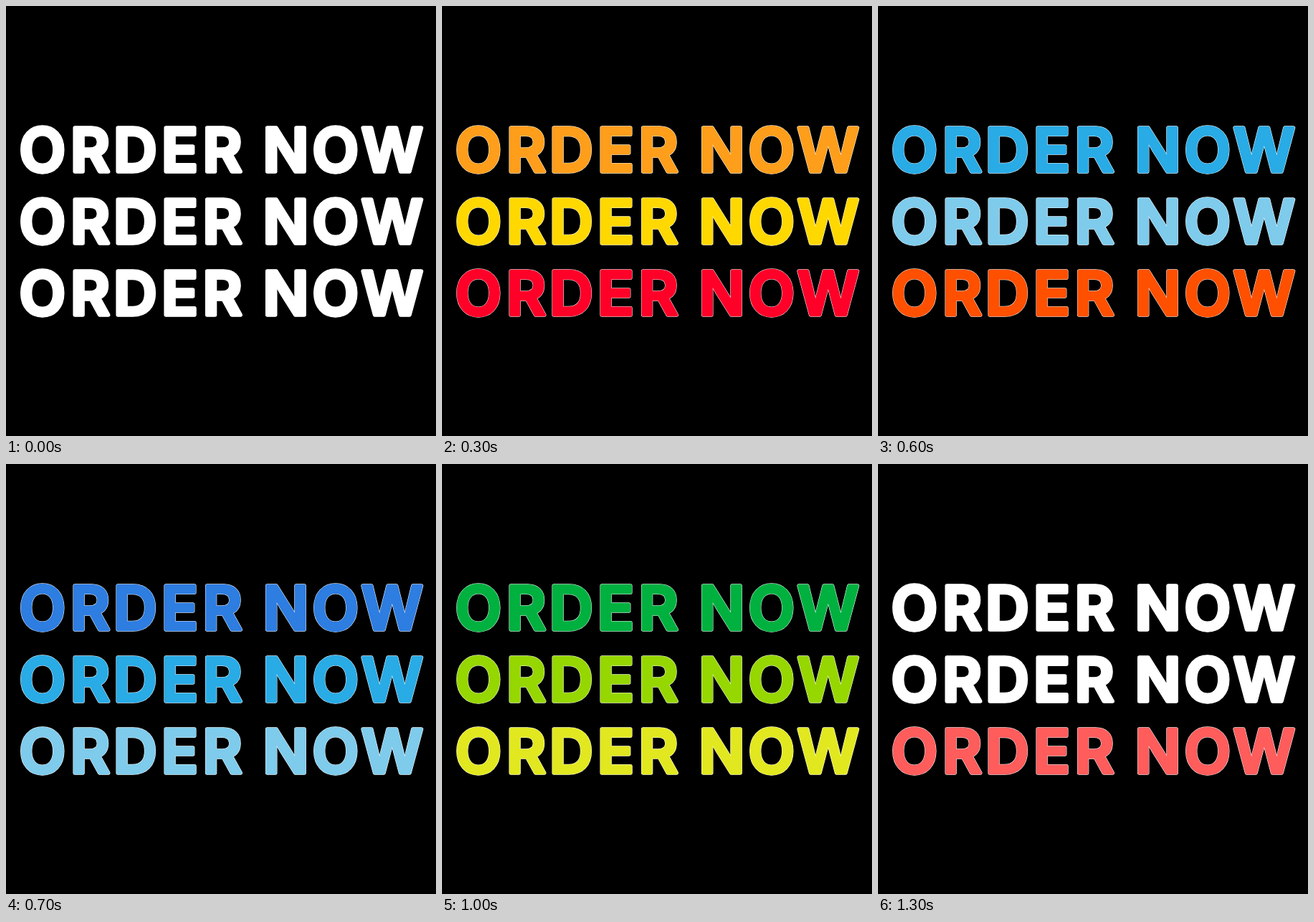
An HTML page with a canvas that plays this animation: 600x600 px, repeating every 1.4 s.

```html
<!DOCTYPE html>
<html lang="en">
<head>
<meta charset="utf-8">
<title>Order now</title>
<style>
  html, body { margin: 0; width: 100%; height: 100%; overflow: hidden; background: #000; }
  canvas { display: block; width: 100vw; height: 100vh; }
</style>
</head>
<body>
<canvas id="stage" width="600" height="600" role="img" aria-label="ORDER NOW, three times"></canvas>
<script>
const ctx = document.getElementById('stage').getContext('2d');
const STEP = 100;
const TEXT = 'ORDER NOW';
// Ink centre of each character; the space has none.
const CENTRES = [51, 119.5, 181.5, 243.5, 304, 0, 390.5, 460, 539];
const COLORS = [
  '#ffffff', '#ff0028', '#ffd800', '#ff9e1b', '#ff5000', '#7ecbec', '#29abe6',
  '#2e7de1', '#e2e81f', '#96d700', '#00b140', '#ff5c5c', '#ffffff', '#ffffff'
];

ctx.font = '600 84px Inter, "Open Sans", sans-serif';
ctx.lineJoin = 'round';
ctx.lineCap = 'round';

const letters = [...TEXT].map((char, i) => {
  const m = ctx.measureText(char);
  return { char, x: CENTRES[i] + (m.actualBoundingBoxLeft - m.actualBoundingBoxRight) / 2 };
}).filter(l => l.char !== ' ');

function drawLine(y, color, weight) {
  ctx.fillStyle = ctx.strokeStyle = color;
  ctx.lineWidth = weight;
  for (const { char, x } of letters) {
    ctx.strokeText(char, x, y);
    ctx.fillText(char, x, y);
  }
}

function render(step) {
  ctx.fillStyle = '#000';
  ctx.fillRect(0, 0, 600, 600);
  for (let row = 0; row < 3; row++) {
    // Each line follows the one above by one step.
    const color = COLORS[Math.max(0, step - row)];
    const y = 230.5 + row * 100.3;
    drawLine(y, '#fff', 5.4);
    drawLine(y, color, 4.4);
  }
}

let shown = -1;
const start = performance.now();
function tick(now) {
  const step = Math.floor(Math.max(0, now - start) / STEP) % COLORS.length;
  if (step !== shown) render(shown = step);
  requestAnimationFrame(tick);
}
tick(start);
</script>
</body>
</html>
```
